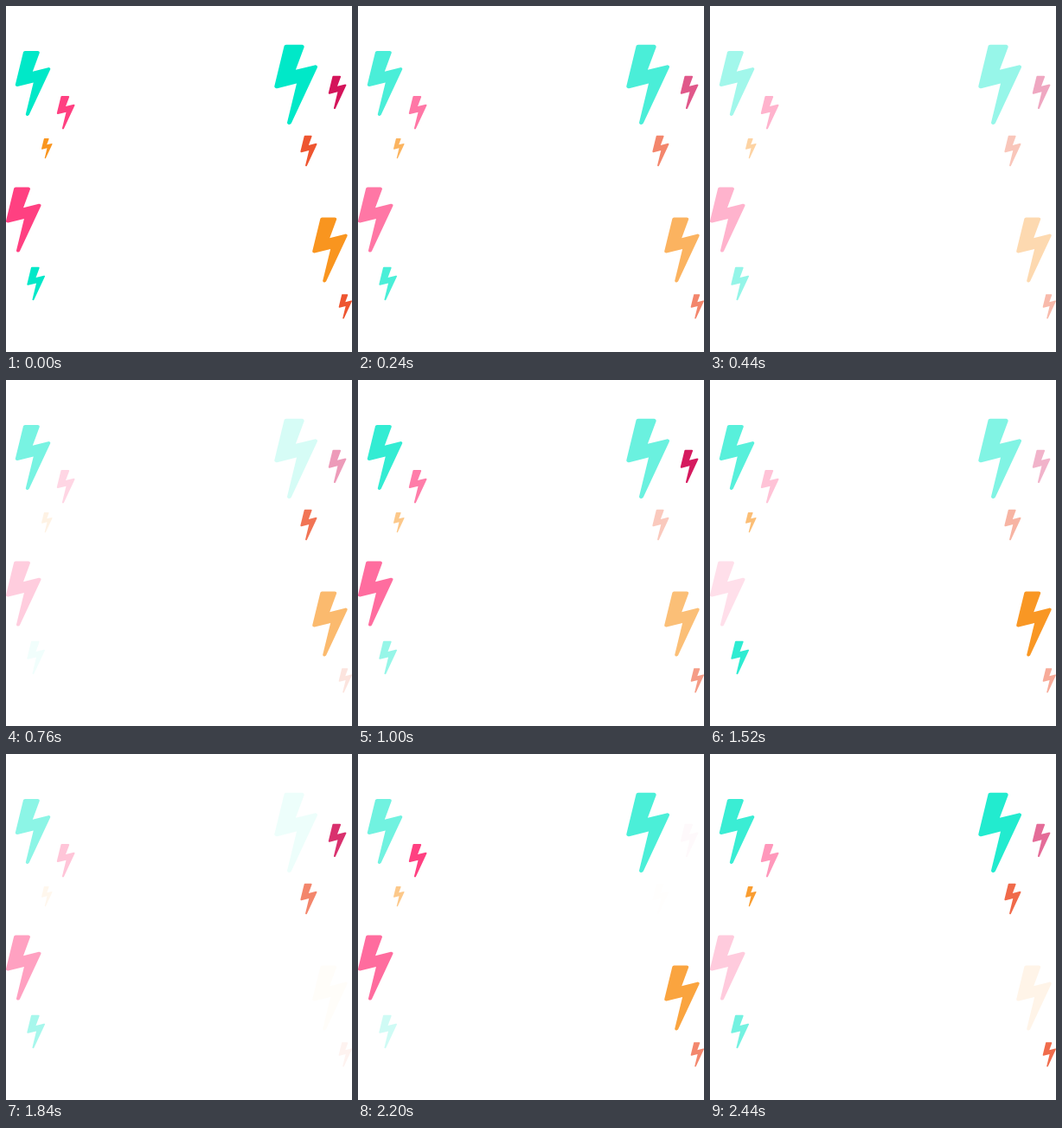
An HTML page that plays this animation: 400x400 px, repeating every 2.48 s.

```html
<!DOCTYPE html>
<html lang="en">
<head>
<meta charset="utf-8">
<title>Flickering bolts</title>
<style>
  html, body { margin: 0; width: 100%; height: 100%; overflow: hidden; background: #fff; }
  svg { display: block; width: 100vw; height: 100vh; }
</style>
</head>
<body>
<svg id="stage" viewBox="0 0 400 400"></svg>
<script>
const NS = 'http://www.w3.org/2000/svg';
const LOOP = 2480, STEP = 40;
const TEAL = '#00e8c8', PINK = '#ff4081', ORANGE = '#f9951f', CRIMSON = '#d4145a', RED = '#ee5530';

// One bolt with rounded corners, its box starting at 0,0.
const SHAPE_HEIGHT = 1659;
const SHAPE = 'M885 433q18 20 7 44l-540 1157q-13 25-42 25-4 0-14-2-17-5-25-18t-5-26l197-808' +
  '-406 101q-4 1-12 1-18 0-31-11-18-15-13-39l201-825q4-14 16-23t28-9h328q19 0 32 12t13 30' +
  'q0 8-5 18l-171 463 396-98q8-2 12-2 19 0 34 15z';

// All bolts start fading together, then each pulses at its own period.
const START = 40, SPLIT = 400, FIRST_PERIOD = 1380;

const stage = document.getElementById('stage');
const bolts = [
  bolt(10.8, 52, 75, TEAL, 715),
  bolt(58.8, 104, 38.4, PINK, 1035),
  bolt(41, 153, 23.3, ORANGE, 1200),
  bolt(0, 209.6, 75, PINK, 970),
  bolt(24.3, 301.8, 38.4, TEAL, 1350),
  bolt(310.3, 44.8, 92.2, TEAL, 1130),
  bolt(372.8, 80.8, 38.2, CRIMSON, 800),
  bolt(340.4, 149.8, 35.4, RED, 555),
  bolt(354.2, 244.5, 75, ORANGE, 640),
  bolt(384.7, 333.2, 28.4, RED, 1130)
];

function bolt(x, y, height, color, period) {
  const path = document.createElementNS(NS, 'path');
  path.setAttribute('d', SHAPE);
  path.setAttribute('fill', color);
  path.setAttribute('transform', `translate(${x} ${y}) scale(${height / SHAPE_HEIGHT})`);
  stage.append(path);
  return { path, period };
}

function opacityAt(t, period) {
  const shared = Math.max(0, Math.min(t, SPLIT) - START) / FIRST_PERIOD;
  const own = Math.max(0, t - SPLIT) / period;
  return Math.abs(1 - 2 * ((shared + own) % 1));
}

function render(time) {
  const t = Math.floor((time % LOOP) / STEP) * STEP;
  for (const { path, period } of bolts) path.style.opacity = opacityAt(t, period);
}

let start;
function tick(now) {
  start ??= now;
  render(Math.max(0, now - start));
  requestAnimationFrame(tick);
}
render(0);
requestAnimationFrame(tick);
</script>
</body>
</html>
```
